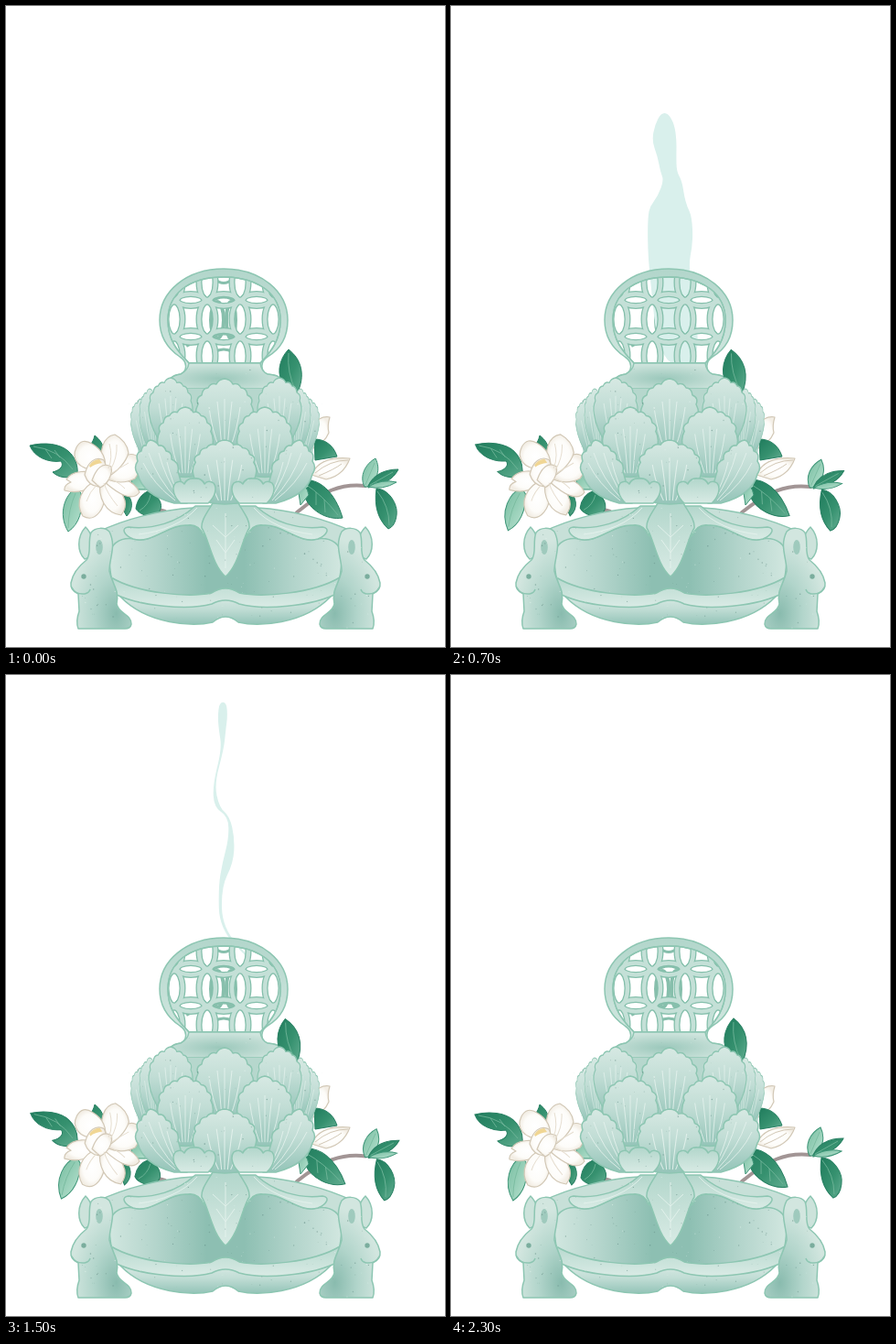
Write an HTML page that moves like this. It is 480 by 700 pixels and loops after 2.4 s.

```html
<!DOCTYPE html>
<html lang="en">
<head>
<meta charset="utf-8">
<title>Jade incense burner</title>
<style>
html, body { margin: 0; width: 100%; height: 100%; overflow: hidden; background: #fff; }
svg { display: block; width: 480px; height: 700px; --k: 0; }
.sway { transform: rotate(calc(var(--k) * var(--a))); }
.jade { stroke: #8dc6b2; stroke-width: 1.5; stroke-linejoin: round; }
.jade path, .jade ellipse, .jade use { vector-effect: non-scaling-stroke; }
.vein { fill: none; stroke: #e6f3ee; stroke-width: 1; opacity: .85; }
.leaf { fill: url(#green); stroke: #288163; stroke-width: 1; }
.pale { fill: url(#mint); stroke: #3d9577; stroke-width: 1; }
.rib { fill: none; stroke: #76b99d; stroke-width: .8; }
.bloom { fill: url(#cream); stroke: #d2c8b6; stroke-width: 1.2; stroke-linejoin: round; }
.twig { fill: none; stroke: #a29595; stroke-width: 4; stroke-linecap: round; }
</style>
</head>
<body>
<svg viewBox="0 0 480 700">
<defs>
  <linearGradient id="green" x1="0" y1="0" x2="1" y2="1">
    <stop offset="0" stop-color="#207c5d"/><stop offset=".55" stop-color="#36916f"/><stop offset="1" stop-color="#62ad91"/>
  </linearGradient>
  <linearGradient id="mint" x1="0" y1="0" x2="1" y2="1">
    <stop offset="0" stop-color="#75bc9f"/><stop offset="1" stop-color="#b8e2d0"/>
  </linearGradient>
  <radialGradient id="cream">
    <stop offset="0" stop-color="#fff"/><stop offset=".7" stop-color="#fdfcf9"/><stop offset="1" stop-color="#f3eee5"/>
  </radialGradient>
  <linearGradient id="shade" x2="0" y2="1">
    <stop offset="0" stop-color="#d7e9e3"/><stop offset=".45" stop-color="#c1ddd5"/><stop offset="1" stop-color="#94c4b8"/>
  </linearGradient>
  <linearGradient id="glow" x2="0" y2="1">
    <stop offset="0" stop-color="#b2d6cb"/><stop offset="1" stop-color="#d9ebe5"/>
  </linearGradient>
  <linearGradient id="panel">
    <stop offset="0" stop-color="#d2e7e0"/><stop offset=".2" stop-color="#b4d5cc"/><stop offset=".42" stop-color="#8dbfb2"/>
    <stop offset=".58" stop-color="#8dbfb2"/><stop offset=".8" stop-color="#b4d5cc"/><stop offset="1" stop-color="#d2e7e0"/>
  </linearGradient>
  <radialGradient id="fur" cx=".75" cy=".85" r=".75">
    <stop offset="0" stop-color="#89bbae"/><stop offset=".5" stop-color="#b2d5cb"/><stop offset="1" stop-color="#d2e6df"/>
  </radialGradient>
  <radialGradient id="neck" cx=".45" cy=".6" r=".6">
    <stop offset="0" stop-color="#9bc8bb"/><stop offset="1" stop-color="#d0e5de"/>
  </radialGradient>

  <path id="petalShape" d="M0 0Q7 1 9 6Q15 4 18 10Q24 10 25 18Q32 21 29 28Q33 35 31 44Q28 62 14 79Q0 82-14 79Q-28 62-31 44Q-33 35-29 28Q-32 21-25 18Q-24 10-18 10Q-15 4-9 6Q-7 1 0 0Z"/>
  <g id="petal">
    <use href="#petalShape" fill="url(#shade)"/>
    <path class="vein" d="M0 22V76M-8 25Q-5 50-3 76M8 25Q5 50 3 76M-17 31Q-14 55-6 76M17 31Q14 55 6 76"/>
  </g>
  <path id="bud" fill="url(#glow)" d="M-15 27C-23 20-25 10-21 5Q-15 1-11 6Q-8-1 0 0Q8-1 11 6Q15 1 21 5C25 10 23 20 15 27Z"/>
  <path id="hole" d="M238 296C277 296 300 315 300 343C300 367 288 379 278 390H200C190 379 177 367 177 343C177 315 199 296 238 296Z"/>
  <clipPath id="holeClip"><use href="#hole"/></clipPath>
  <clipPath id="stone">
    <path d="M180 406H300L346 435L338 515L295 543H184L143 515L133 435ZM200 390H278L290 406H190ZM205 548H275L385 574L408 630L403 680H345L350 655Q240 690 130 655L137 680H78L72 630L95 574Z"/>
  </clipPath>

  <g id="rabbit">
    <path d="M86 604C78 596 77 580 87 569C94 576 97 588 98 600Z" fill="#cce3db"/>
    <path fill="url(#fur)" d="M79 680Q76 672 80 661L79 642Q70 638 71 630C73 619 79 612 88 605C94 598 89 585 93 575C98 569 108 569 113 574C121 590 113 602 113 617C117 634 124 637 121 653C123 664 137 664 137 675Q136 680 130 680Z"/>
    <path fill="none" d="M72 635Q76 643 86 642Q91 641 92 637"/>
    <ellipse cx="102" cy="591" rx="3.8" ry="8" fill="#9fcabd" stroke="none"/>
    <circle cx="85" cy="623" r="2.7" fill="#7aad9d" stroke="none"/>
  </g>
  <g id="fold">
    <path fill="url(#glow)" d="M207 546C187 564 161 572 134 569C125 570 129 578 139 582C159 588 179 565 199 567C208 566 213 571 216 578L228 546Z"/>
    <path class="vein" d="M209 548C194 565 171 574 145 577"/>
  </g>
  <g id="side">
    <use href="#petal" transform="translate(147 429) rotate(-6) scale(.42 .74)"/>
    <use href="#petal" transform="translate(157 418) rotate(-3) scale(.4 .8)"/>
    <use href="#petal" transform="translate(180 406) scale(.76 .9)"/>
  </g>
  <g id="front">
    <use href="#petal" transform="translate(196 438) scale(.96 .95)"/>
    <path fill="url(#shade)" d="M158 474Q164 475 167 480Q173 479 175 486Q182 487 181 495Q190 499 188 508L198 543H184C165 538 148 529 144 511Q139 504 144 497Q141 488 148 486Q149 479 153 480Q154 475 158 474Z"/>
    <path class="vein" d="M156 488Q165 516 188 540M167 488Q174 515 190 539M150 499Q161 522 185 540M176 498Q181 520 192 539"/>
  </g>
</defs>

<!-- lattice wall behind the smoke -->
<g clip-path="url(#holeClip)" fill="none" stroke="#87bfac" stroke-width="4">
  <ellipse cx="231" cy="343" rx="7" ry="20"/><ellipse cx="246" cy="343" rx="5" ry="20"/>
  <path d="M222 324Q238 311 254 324M222 364Q238 351 254 364M180 321L188 314M197 371L203 368M285 314L294 321" />
  <path d="M228 298Q238 307 248 298M228 378Q238 372 248 378" stroke-width="3"/>
</g>
<path id="smoke" fill="#d9f0ec"/>

<g id="globe" class="jade">
  <path fill="url(#glow)" fill-rule="evenodd" d="M238 287C279 287 308 312 308 343C308 363 298 376 286 383C278 388 278 398 285 402Q298 403 300 407L303 418H176L180 407Q183 403 191 402C199 398 198 388 190 383C178 375 168 363 168 343C168 312 197 287 238 287ZM238 296C199 296 177 315 177 343C177 367 190 379 200 390H278C288 379 300 367 300 343C300 315 277 296 238 296Z"/>
  <g id="lattice" clip-path="url(#holeClip)" fill="none"></g>
  <use href="#hole" fill="none"/>
  <path fill="url(#neck)" d="M200 390H278Q279 399 286 402Q298 403 300 407L303 418H176L180 407Q183 403 191 402Q199 398 200 390Z"/>
</g>

<!-- gardenia, left -->
<path class="twig" d="M160 548L174 552"/>
<g class="sway" style="--a:2deg;transform-origin:75px 505px">
  <path class="leaf" d="M26 480C42 476 59 478 68 486C76 493 79 502 78 512C68 517 57 515 51 509C59 507 64 502 60 497C47 499 31 493 26 480Z"/>
  <path class="rib" d="M30 481Q57 484 73 506M43 484L50 494M53 485L59 493"/>
</g>
<g class="sway" style="--a:11deg;transform-origin:76px 527px">
  <path class="pale" d="M77 526C65 533 56 554 68 574C80 566 85 550 82 532Z"/>
  <path class="rib" d="M76 532Q68 550 68 570"/>
</g>
<path class="leaf" d="M97 469C109 478 109 490 101 499L82 486C90 483 95 478 97 469Z"/>
<g class="sway" style="--a:6deg;transform-origin:132px 530px">
  <path class="leaf" d="M128 530C138 535 141 548 132 557C126 548 126 540 128 530Z"/>
</g>
<g class="sway" style="--a:4deg;transform-origin:160px 530px">
  <path class="leaf" d="M155 530C168 534 173 546 167 553C160 560 146 556 142 549C143 540 148 533 155 530Z"/>
  <path class="rib" d="M158 534Q156 545 146 551"/>
</g>
<path class="pale" d="M136 508Q151 514 156 528L138 528Z"/>
<g class="sway" style="--a:.8deg;transform-origin:140px 525px">
  <g class="bloom">
    <path d="M101 515C92 505 72 507 66 517L71 520Q63 523 64 529C78 533 94 529 103 518Z"/>
    <path d="M101 517C82 525 75 542 84 557Q94 563 102 553C110 543 109 529 104 517Z"/>
    <path d="M103 517C100 537 109 554 126 556Q132 548 130 540C125 525 115 519 106 514Z"/>
    <path d="M106 513C119 512 140 517 146 531C138 542 123 533 108 520Z"/>
    <path d="M109 511C119 494 136 484 145 493Q149 506 141 516Q126 524 109 516Z"/>
    <path d="M106 505C101 486 106 470 119 468Q132 475 134 488C131 499 121 509 110 515Z"/>
    <path d="M99 506C79 507 71 494 77 482Q83 471 94 478C108 486 110 498 108 509Z"/>
    <path d="M86 512C89 498 98 491 107 496C112 505 108 520 101 525C93 524 88 518 86 512Z"/>
    <path d="M94 518C99 504 106 498 115 503C117 512 111 522 103 526Z"/>
  </g>
  <path d="M91 502Q94 496 102 495L105 499Q97 500 92 504Z" fill="#f0d694"/>
  <path d="M113 478Q117 493 112 505M121 479Q122 493 114 507M88 541Q91 531 100 522M122 546Q111 533 107 521M134 499Q125 504 116 510M130 527Q121 518 112 516" fill="none" stroke="#e6ded0"/>
</g>

<!-- branch, right -->
<g class="sway" style="--a:-5deg;transform-origin:315px 424px">
  <path class="leaf" d="M309 375C323 386 328 403 318 424C304 418 298 408 299 396C300 387 304 380 309 375Z"/>
  <path class="rib" d="M309 379Q307 400 317 421"/>
</g>
<g class="bloom">
  <path d="M334 458Q344 447 354 449Q351 459 353 466Q348 478 334 484Z"/>
</g>
<path class="leaf" d="M337 473C348 473 358 479 362 492L338 496Z"/>
<path class="bloom" d="M334 512C340 498 354 492 376 494C372 505 364 514 350 517Z"/>
<path d="M338 510Q354 496 374 496M342 513Q359 506 367 500" fill="none" stroke="#d2c8b6"/>
<g class="sway" style="--a:1.3deg;transform-origin:318px 552px">
  <path class="twig" d="M318 553C346 530 366 521 393 524"/>
  <path class="pale" d="M392 525C386 513 393 500 404 494C410 506 406 518 395 525Z"/>
  <path class="leaf" d="M396 524C402 511 415 506 429 506C423 518 411 523 396 526Z"/>
  <path class="pale" d="M396 525Q411 516 427 520Q412 529 396 525Z"/>
  <path class="rib" d="M393 523L403 499M398 523L423 509"/>
  <g class="sway" style="--a:6deg;transform-origin:405px 527px">
    <path class="leaf" d="M405 527C418 527 429 544 427 556C426 564 423 569 418 571C408 562 402 548 405 527Z"/>
    <path class="rib" d="M406 530Q419 546 419 567"/>
  </g>
</g>
<g class="sway" style="--a:-5deg;transform-origin:325px 519px">
  <path class="leaf" d="M322 518C342 514 360 531 368 559C350 562 332 550 326 535Z"/>
  <path class="rib" d="M327 522Q346 534 363 556M339 531V545M348 539L349 553"/>
</g>
<path class="pale" d="M318 519Q329 522 331 534L322 545Z"/>

<!-- pedestal -->
<g class="jade">
  <path fill="url(#shade)" d="M125 645C155 676 205 678 226 673Q240 661 254 673C275 678 325 676 355 645Z"/>
  <path fill="url(#glow)" d="M112 618L117 641C145 656 200 660 225 653Q240 645 255 653C280 660 335 656 363 641L368 618Z"/>
  <path fill="#c7e0d8" d="M99 575C130 560 170 550 205 548H275C310 550 350 560 381 575L366 606H114Z"/>
  <path fill="url(#panel)" d="M112 600C116 585 127 580 141 582C159 588 179 565 199 567C207 566 213 571 216 578L240 590L264 578C267 571 273 566 281 567C301 565 321 588 339 582C353 580 364 585 368 600L365 624C335 642 280 646 255 641Q240 631 225 641C200 646 145 642 115 624Z"/>
  <use href="#fold"/><use href="#fold" transform="translate(480) scale(-1 1)"/>
  <path fill="url(#glow)" d="M226 543C220 553 213 562 214 570C222 582 225 610 240 623C255 610 258 582 266 570C267 562 260 553 254 543Z"/>
  <path class="vein" d="M240 554V614M240 580L226 567M240 580L254 567M240 597L230 583M240 597L250 583"/>
  <use href="#rabbit"/><use href="#rabbit" transform="translate(480) scale(-1 1)"/>
</g>

<!-- lotus bowl -->
<g class="jade">
  <path fill="#b6d7cd" stroke="none" d="M178 418H302L338 470L330 525L296 543H184L150 525L142 470Z"/>
  <use href="#side"/><use href="#side" transform="translate(479) scale(-1 1)"/>
  <use href="#petal" transform="translate(239 407)"/>
  <use href="#front"/><use href="#front" transform="translate(479) scale(-1 1)"/>
  <use href="#petal" transform="translate(239 474) scale(1.1 .87)"/>
  <use href="#bud" transform="translate(206 516)"/><use href="#bud" transform="translate(270 516)"/>
</g>
<g id="specks" clip-path="url(#stone)"></g>
</svg>
<script>
const $ = id => document.getElementById(id);
const LOOP = 2400, STEP = 100;

function add(parent, tag, attrs) {
  const el = document.createElementNS('http://www.w3.org/2000/svg', tag);
  for (const key in attrs) el.setAttribute(key, attrs[key]);
  parent.append(el);
}

// interlocking rings seen as upright and level lenses
for (const [stroke, width] of [['#84bfab', 7], ['#c4e0d7', 4.4]]) {
  const lens = (cx, cy, rx, ry) =>
    add($('lattice'), 'ellipse', { cx, cy, rx, ry, stroke, 'stroke-width': width });
  for (let x = 184; x <= 292; x += 36)
    for (let y = 302; y <= 382; y += 40) lens(x, y, 9, 19);
  for (let x = 202; x <= 274; x += 36)
    for (const y of [321, 361]) lens(x, y, 15, 6.5);
}

let seed = 17;
const random = () => (seed = seed * 16807 % 2147483647) / 2147483647;
for (let i = 0; i < 330; i++)
  add($('specks'), 'circle', {
    cx: 72 + 336 * random(), cy: 395 + 285 * random(), r: .3 + .5 * random(),
    fill: random() < .75 ? '#557f77' : '#eef7f3', opacity: .25 + .3 * random()
  });

// smoke outline by time: rows of height, left edge, right edge
const rise = [
  [140,230,238, 150,222,244, 165,221,247, 178,230,248, 195,233,252, 208,230,254,
   219,214,253, 235,213,256, 240,213,262, 265,212,264, 290,212,263, 395,222,270],
  [71,229,236, 88,225,245, 112,217,246, 135,217,243, 153,221,236, 155,238,249,
   184,251,259, 186,227,262, 210,220,266, 245,221,266, 284,226,250, 390,240,288],
  [37,234,241, 55,228,244, 75,226,241, 100,233,237, 125,225,229, 147,228,238,
   154,249,253, 179,237,253, 205,233,254, 240,231,236, 284,234,242, 365,275,279],
  [25,233,241, 38,234,241, 48,237,240, 68,238,239, 115,227,227, 143,227,230,
   155,239,239, 178,248,248, 205,239,245, 226,233,235, 272,233,233, 275,260,262]
];
const squash = rows => rows.map((v, i) => i % 3 ? v : 395 - (395 - v) * .38);
const fade = rows => rows.map((v, i) => i % 3 ? 238 : v - 1);
const keys = [
  [200, squash(rise[0])], [500, rise[0]], [600, rise[0]], [900, rise[1]],
  [1200, rise[2]], [1700, rise[3]], [2000, fade(rise[3])]
];

function outline(rows) {
  const left = [], right = [];
  for (let i = 0; i < rows.length; i += 3) {
    left.push([rows[i + 1], rows[i]]);
    right.unshift([rows[i + 2], rows[i]]);
  }
  const pts = [...left, ...right];
  const mid = (a, b) => [(a[0] + b[0]) / 2, (a[1] + b[1]) / 2];
  let d = 'M' + mid(pts.at(-1), pts[0]);
  pts.forEach((p, i) => d += 'Q' + p + ' ' + mid(p, pts[(i + 1) % pts.length]));
  return d + 'Z';
}

function smokeAt(t) {
  const i = keys.findIndex(key => key[0] > t);
  if (i < 1 || t === keys[0][0]) return '';
  const [t0, a] = keys[i - 1], [t1, b] = keys[i];
  const f = (t - t0) / (t1 - t0);
  return outline(a.map((v, n) => v + (b[n] - v) * f));
}

const svg = document.querySelector('svg');
const start = performance.now();
function draw() {
  const t = Math.floor((performance.now() - start) % LOOP / STEP) * STEP;
  svg.style.setProperty('--k', (1 - Math.cos(2 * Math.PI * t / LOOP)) / 2);
  $('smoke').setAttribute('d', smokeAt(t));
  requestAnimationFrame(draw);
}
draw();
</script>
</body>
</html>
```
